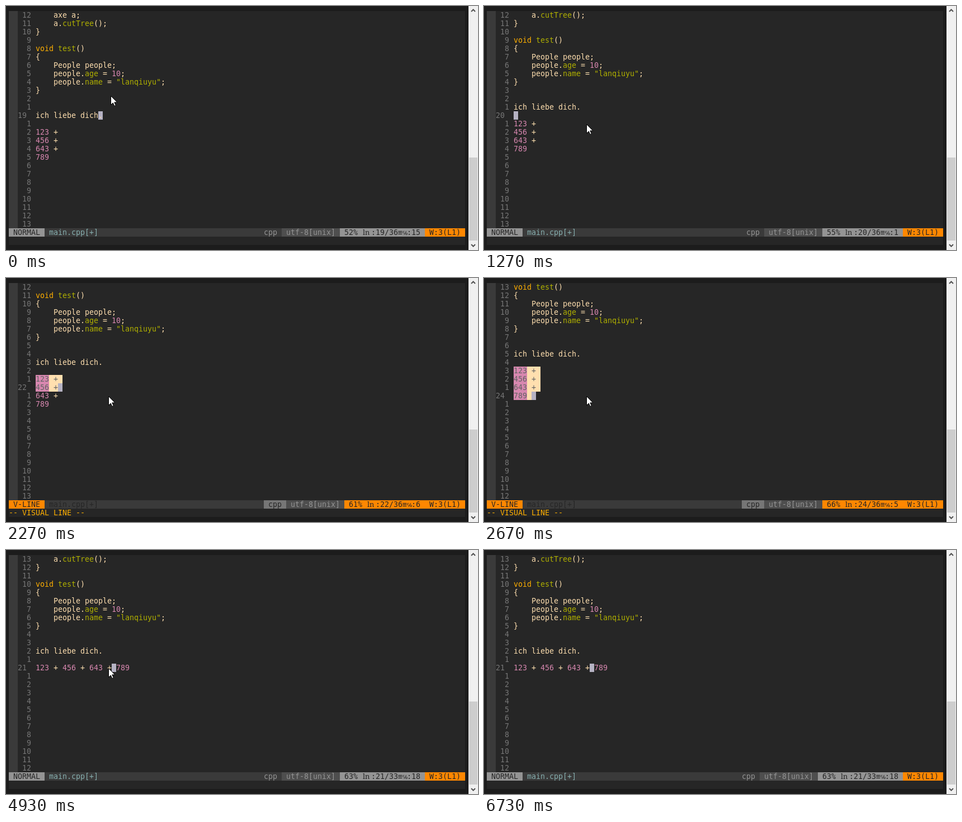
An HTML page with a canvas that plays this animation: 844 by 438 pixels, repeating every 6990 ms.

```html
<!DOCTYPE html>
<html lang="en">
<head>
<meta charset="utf-8">
<title>Joining lines in an editor</title>
<style>
html, body { margin: 0; width: 100%; height: 100%; overflow: hidden; background: #1c1c1c; }
canvas { display: block; }
</style>
</head>
<body>
<canvas id="stage" width="844" height="438"></canvas>
<script>
const ctx = document.getElementById('stage').getContext('2d', { alpha: false });
const LOOP = 6990, CELL = 8, ROW = 15, LEFT = 5, TOP = 9, TEXT_COL = 6, ROWS = 26;
const MONO = '13.288px "DejaVu Sans Mono", monospace';
const color = {
  frame: '#1c1c1c', bg: '#262626', gutter: '#3a3a3a', section: '#4e4e4e', visual: '#626262',
  dim: '#767676', light: '#949494', fg: '#ffdfaf', yellow: '#ffaf00', green: '#afaf00',
  pink: '#d787af', blue: '#87afaf', orange: '#ff8700', cursor: '#b5b2c3'
};

const FIRST_LINE = 7, SUM_LINE = 21;
const head = ['    axe a;', '    a.cutTree();', '}', '', 'void test()', '{', '    People people;',
  '    people.age = 10;', '    people.name = "lanqiuyu";', '}', '', '', 'ich liebe dich.', ''];
const split = [...head, '123 +', '456 +', '643 +', '789 '];
const joined = [...head, '123 + 456 + 643 + 789'];

const states = [
  { at: 0, line: 19, col: 15 },
  { at: 1270, line: 20, col: 1 },
  { at: 1470, line: 21, col: 5 },
  { at: 2130, line: 21, col: 5, visual: true },
  { at: 2270, line: 22, col: 6, visual: true },
  { at: 2470, line: 23, col: 6, visual: true },
  { at: 2670, line: 24, col: 5, visual: true },
  { at: 3400, line: 25, col: 1, visual: true },
  { at: 4270, line: 24, col: 5, visual: true },
  { at: 4930, line: 21, col: 18, joined: true }
];

function rect(x, y, w, h, fill) {
  ctx.fillStyle = fill;
  ctx.fillRect(x, y, w, h);
}

function block(col, row, cells, fill) {
  rect(LEFT + col * CELL, TOP + row * ROW, cells * CELL, ROW, fill);
}

function glyph(ch, col, row, fill) {
  ctx.fillStyle = fill;
  ctx.font = MONO;
  let x = LEFT + col * CELL;
  if (ch === 'ln') {
    ctx.font = '13px "Noto Serif", serif';
    x += 1;
  } else if (ch === '℅') {
    ctx.font = '9px "DejaVu Sans", sans-serif';
  }
  ctx.fillText(ch, x, TOP + row * ROW + 12);
}

function print(text, col, row, fill) {
  [...text].forEach((ch, i) => { if (ch !== ' ') glyph(ch, col + i, row, fill); });
}

function syntaxColors(text) {
  const colors = Array(text.length).fill(color.fg);
  for (const m of text.matchAll(/void|"\w+"|test|cutTree|age|name|\d+/g)) {
    const c = m[0] === 'void' ? color.yellow : /^\d/.test(m[0]) ? color.pink : color.green;
    colors.fill(c, m.index, m.index + m[0].length);
  }
  return colors;
}

function drawLine(text, number, row, state) {
  const current = number === state.line;
  const selected = state.visual && number >= SUM_LINE && number <= state.line;
  const label = current ? String(number) : String(Math.abs(number - state.line)).padStart(3);
  print(label, 2, row, color.dim);

  const colors = syntaxColors(text);
  if (selected) {
    for (let i = 0; i <= text.length; i++) block(TEXT_COL + i, row, 1, colors[i] || color.fg);
  }
  if (current) block(TEXT_COL + state.col - 1, row, 1, color.cursor);
  [...text].forEach((ch, i) => print(ch, TEXT_COL + i, row, selected ? color.visual : colors[i]));
}

function drawStatus(state, total) {
  const row = ROWS, v = state.visual, accent = v ? color.orange : color.light;
  block(0, row, 102, color.gutter);
  block(0, row, 8, accent);
  print(v ? 'V-LINE' : 'NORMAL', 1, row, color.bg);
  print('main.cpp[+]', 9, row, v ? color.bg : color.blue);

  block(93, row, 9, color.orange);
  print('W:3(L1)', 94, row, color.bg);

  const column = ':' + state.col;
  const start = 93 - 16 - column.length;
  block(start, row, 93 - start, accent);
  print(Math.floor(state.line / total * 100) + '%', start + 1, row, color.bg);
  glyph('ln', start + 5, row, color.bg);
  print(`:${state.line}/${total}≡℅${column}`, start + 7, row, color.bg);

  block(start - 13, row, 13, color.section);
  print('utf-8[unix]', start - 12, row, color.light);
  if (v) block(start - 18, row, 5, color.dim);
  print('cpp', start - 17, row, v ? color.bg : color.light);
  if (v) print('-- VISUAL LINE --', 0, row + 1, color.yellow);
}

function chevron(y, dir) {
  ctx.strokeStyle = '#505050';
  ctx.lineWidth = 2;
  ctx.beginPath();
  ctx.moveTo(832, y - 2 * dir);
  ctx.lineTo(835.5, y + 1.5 * dir);
  ctx.lineTo(839, y - 2 * dir);
  ctx.stroke();
}

function drawScrollbar() {
  rect(827, 0, 17, 438, '#f0f0f0');
  rect(828, 272, 15, 149, '#cdcdcd');
  chevron(8, -1);
  chevron(430, 1);
}

function bezier(a, b, c, d, u) {
  const s = 1 - u;
  return s * s * s * a + 3 * s * s * u * b + 3 * s * u * u * c + u * u * u * d;
}

// The pointer moves in discrete steps and leaves through the bottom edge.
function pointerAt(t) {
  if (t < 6200) {
    const u = Math.max(0, Math.min(3, Math.floor((t - 330) / 70) + 1)) / 3;
    return [187 - 4 * u, 161 + 51 * u];
  }
  const step = Math.floor((t - 6200) / 66.25) + 1;
  if (step > 8) return null;
  const u = step / 9;
  return [bezier(183, 300, 270, -5, u), bezier(212, 140, 330, 470, u)].map(Math.round);
}

const arrow = new Path2D('M.5 .5V16.5L4.3 12.9L6.8 18.5L9.3 17.4L6.8 11.9H11.8Z');
function drawPointer(t) {
  const p = pointerAt(t);
  if (!p) return;
  ctx.save();
  ctx.translate(...p.map(Math.round));
  ctx.fillStyle = '#fff';
  ctx.fill(arrow);
  ctx.strokeStyle = '#000';
  ctx.lineWidth = 1;
  ctx.stroke(arrow);
  ctx.restore();
}

function draw(t) {
  const state = states.findLast(s => t >= s.at);
  const lines = state.joined ? joined : split;
  const total = state.joined ? 33 : 36;
  const top = Math.min(state.line - 12, total - ROWS + 1);

  rect(0, 0, 844, 438, color.frame);
  block(0, 0, 102, color.bg);
  rect(LEFT, TOP, 816, 28 * ROW, color.bg);
  rect(LEFT, TOP, 16, ROWS * ROW, color.gutter);
  for (let row = 0; row < ROWS; row++) {
    const number = top + row;
    drawLine(lines[number - FIRST_LINE] || '', number, row, state);
  }
  drawStatus(state, total);
  drawScrollbar();
  drawPointer(t);
}

const begin = performance.now();
function tick() {
  draw((performance.now() - begin) % LOOP);
  requestAnimationFrame(tick);
}
tick();
</script>
</body>
</html>
```
